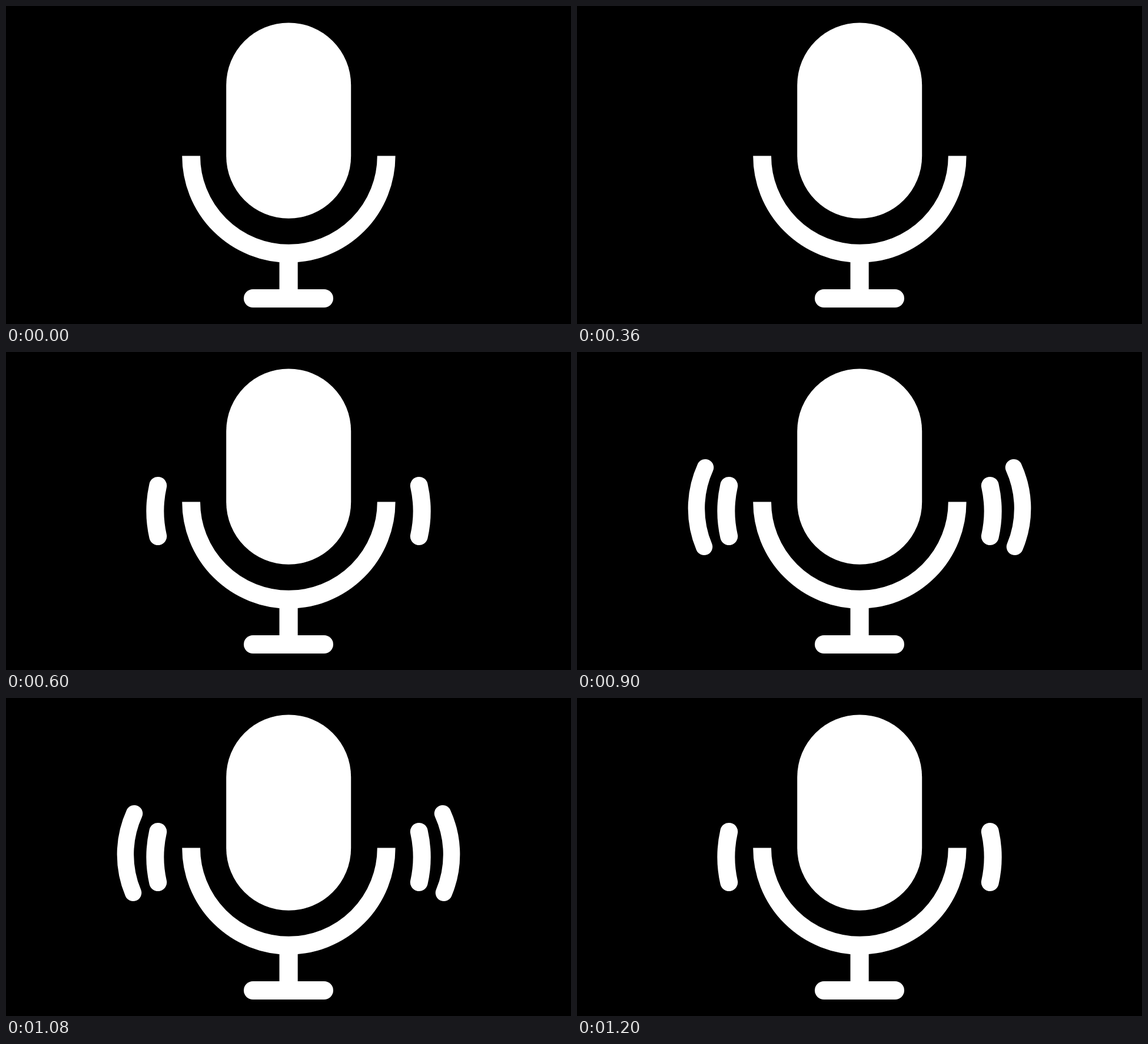
These frames come from a looping animation (960 by 540 pixels, 1.47 s). An HTML page:

```html
<!DOCTYPE html>
<html lang="en">
<head>
<meta charset="utf-8">
<title>Microphone</title>
<style>
  html, body { margin: 0; width: 100%; height: 100%; overflow: hidden; background: #000; }
  svg { display: block; width: 100%; height: 100%; }
</style>
</head>
<body>
<svg viewBox="0 0 960 540" fill="#fff">
  <defs>
    <g fill="none" stroke="#fff" stroke-linecap="round">
      <path id="near" d="M258.2 227A195 195 0 0 0 258.2 313" fill="none" stroke="#fff" stroke-width="30" stroke-linecap="round"/>
      <path id="far" d="M218 196.2A168 168 0 0 0 216 330.8" fill="none" stroke="#fff" stroke-width="28.5" stroke-linecap="round"/>
    </g>
  </defs>
  <rect x="374.2" y="28.4" width="212" height="332.4" rx="106"/>
  <path d="M314.6 254.5A165.8 165.8 0 0 0 646.2 254.5" fill="none" stroke="#fff" stroke-width="30.8"/>
  <rect x="464.5" y="425" width="31.2" height="60"/>
  <rect x="404" y="481" width="152" height="31" rx="15.5"/>
  <g id="nearWaves">
    <use href="#near"/>
    <use href="#near" transform="matrix(-1 0 0 1 960 0)"/>
  </g>
  <g id="farWaves">
    <use href="#far"/>
    <use href="#far" transform="matrix(-1 0 0 1 960 0)"/>
  </g>
</svg>
<script>
  const LOOP = 1470;
  const nearWaves = document.getElementById("nearWaves");
  const farWaves = document.getElementById("farWaves");
  const show = (part, visible) => part.setAttribute("visibility", visible ? "visible" : "hidden");
  const start = performance.now();

  function draw(now) {
    const time = Math.max(0, now - start) % LOOP;
    show(nearWaves, time >= 600);
    show(farWaves, time >= 900 && time < 1200);
    requestAnimationFrame(draw);
  }
  draw(start);
</script>
</body>
</html>
```
